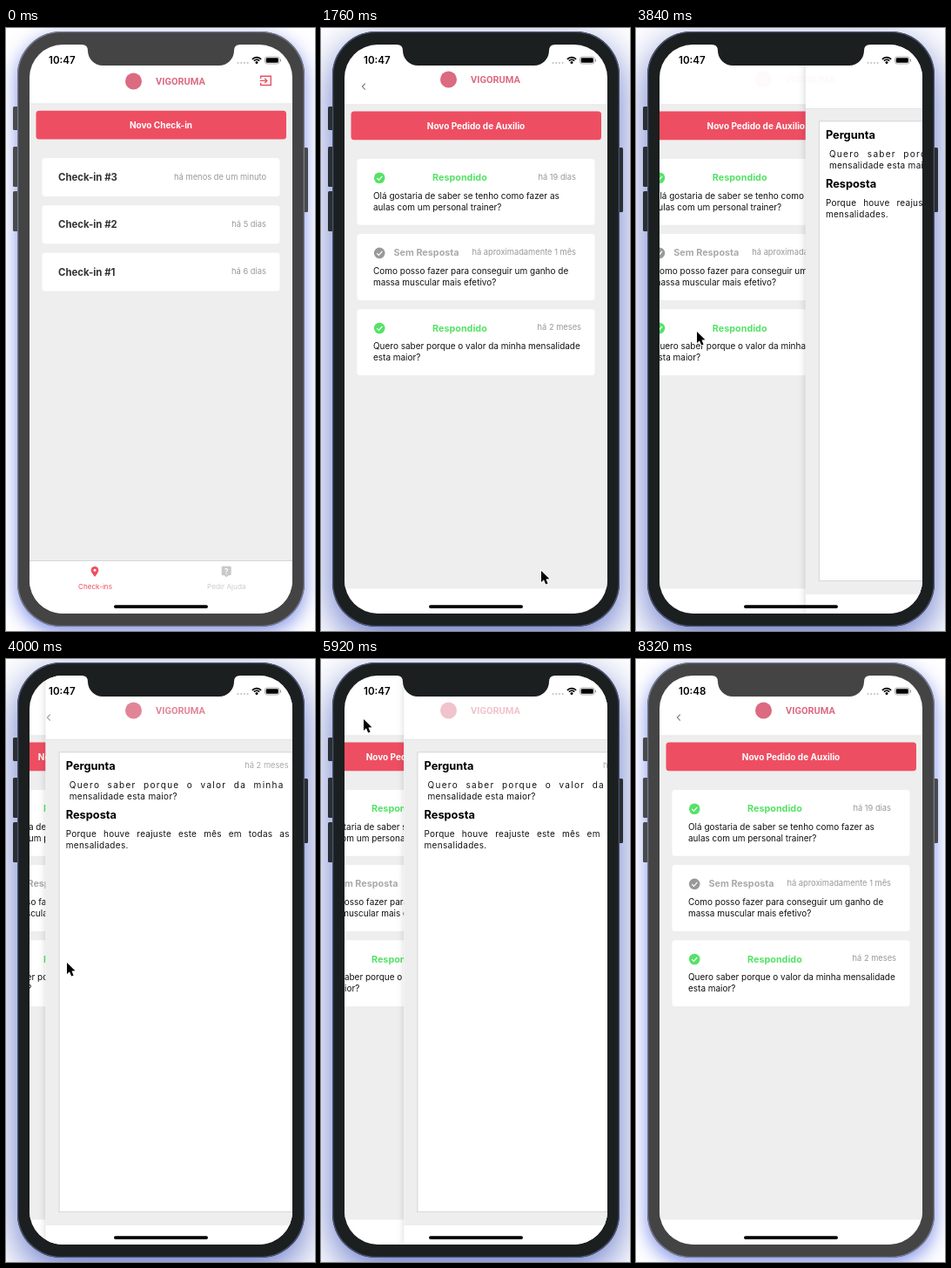
Write an HTML page with a canvas that moves like this. It is 355 by 691 pixels and loops after 8.48 s.

```html
<!DOCTYPE html>
<html lang="pt">
<head>
<meta charset="utf-8">
<title>Check-ins</title>
<style>
html, body { margin: 0; width: 100%; height: 100%; overflow: hidden; background: #fff; }
canvas { display: block; width: 355px; height: 691px; }
</style>
</head>
<body>
<canvas id="stage"></canvas>
<script>
const W = 355, H = 691, LOOP = 8480, STEP = 160;
const SCREEN = { x: 27, y: 19, w: 302, h: 652 };
const RED = '#ee4e62', BRAND = '#dc6a80', GREEN = '#55e267', GRAY = '#999', PAGE = '#eee';
const canvas = document.getElementById('stage');
const ctx = canvas.getContext('2d');
const ratio = window.devicePixelRatio || 1;
canvas.width = W * ratio;
canvas.height = H * ratio;

// ---------- helpers ----------
function box(x, y, w, h, r, fill) {
  ctx.beginPath();
  ctx.roundRect(x, y, w, h, r);
  ctx.fillStyle = fill;
  ctx.fill();
}

function disc(x, y, r, fill) {
  ctx.beginPath();
  ctx.arc(x, y, r, 0, 7);
  ctx.fillStyle = fill;
  ctx.fill();
}

function line(points, color, width) {
  ctx.beginPath();
  points.forEach(([x, y]) => ctx.lineTo(x, y));
  ctx.strokeStyle = color;
  ctx.lineWidth = width;
  ctx.stroke();
}

function text(str, x, y, size, { color = '#111', weight = 400, align = 'left', family = 'Inter', spacing = 0 } = {}) {
  ctx.font = `${weight} ${size}px ${family}, sans-serif`;
  ctx.letterSpacing = spacing + 'px';
  ctx.textAlign = align;
  ctx.fillStyle = color;
  ctx.fillText(str, x, y);
}

function justify(str, x, y, width, size, spacing) {
  const words = str.split(' ');
  ctx.font = `400 ${size}px Inter, sans-serif`;
  ctx.letterSpacing = spacing + 'px';
  const widths = words.map(word => ctx.measureText(word).width);
  const gap = (width - widths.reduce((a, b) => a + b)) / (words.length - 1);
  words.forEach((word, i) => {
    text(word, x, y, size, { spacing });
    x += widths[i] + gap;
  });
}

function withAlpha(alpha, draw) {
  ctx.save();
  ctx.globalAlpha *= alpha;
  draw();
  ctx.restore();
}

const clamp = v => Math.min(1, Math.max(0, v));
const smooth = v => v * v * (3 - 2 * v);

// Cubic bezier (0.2833, 0.99, 0.31833, 0.99)
function slideEase(x) {
  if (x <= 0 || x >= 1) return clamp(x);
  const curve = (a, b, u) => 3 * u * (1 - u) ** 2 * a + 3 * u * u * (1 - u) * b + u ** 3;
  let lo = 0, hi = 1;
  for (let i = 0; i < 24; i++) {
    const mid = (lo + hi) / 2;
    if (curve(0.2833, 0.31833, mid) < x) lo = mid; else hi = mid;
  }
  return curve(0.99, 0.99, lo);
}

// ---------- phone ----------
function phone(focused) {
  const body = focused ? '#1b1f1f' : '#444';
  const button = focused ? '#2b2f33' : '#4a4a4c';
  const rim = focused ? '#4a5474' : '#747a90';
  ctx.save();
  ctx.shadowColor = focused ? 'rgba(60,82,185,.8)' : 'rgba(75,98,225,.7)';
  ctx.shadowBlur = (focused ? 46 : 22) * ratio;
  ctx.shadowOffsetY = (focused ? 15 : 7) * ratio;
  box(13, 4, 330, 682, 50, body);
  ctx.restore();
  for (const [x, y, h] of [[8, 90, 27], [8, 136, 46], [8, 187, 46], [341, 137, 74]]) {
    box(x, y, 6, h, 1.5, button);
  }
  box(13, 4, 330, 682, 50, rim);
  box(14.3, 5.3, 327.4, 679.4, 49, body);
  return body;
}

function notch(color) {
  ctx.beginPath();
  ctx.moveTo(82, 18);
  ctx.lineTo(87, 19);
  ctx.quadraticCurveTo(94, 19, 94, 26);
  ctx.arcTo(94, 43, 112, 43, 17);
  ctx.lineTo(245, 43);
  ctx.arcTo(262, 43, 262, 26, 17);
  ctx.quadraticCurveTo(262, 19, 269, 19);
  ctx.lineTo(274, 18);
  ctx.fillStyle = color;
  ctx.fill();
}

function statusBar(clock) {
  text(clock, 49, 41, 11.6, { weight: 600, color: '#000' });
  for (let i = 0; i < 4; i++) disc(266.5 + i * 3.7, 40, 1.1, '#c4c4c4');
  ctx.strokeStyle = '#000';
  ctx.lineWidth = 1.7;
  for (const r of [7, 4.3]) {
    ctx.beginPath();
    ctx.arc(288, 40.6, r, -Math.PI * 0.76, -Math.PI * 0.24);
    ctx.stroke();
  }
  disc(288, 39.6, 1.5, '#000');
  ctx.beginPath();
  ctx.roundRect(297.5, 33, 16.5, 8, 2.4);
  ctx.strokeStyle = '#999';
  ctx.lineWidth = 0.8;
  ctx.stroke();
  box(298.7, 34.2, 14.1, 5.6, 1.3, '#000');
  box(314.9, 35.6, 1.1, 2.8, 0.5, '#999');
}

// ---------- pages ----------
function brand(y) {
  disc(146.5, y, 9.5, BRAND);
  text('VIGORUMA', 172, y + 4, 11, { weight: 700, color: BRAND, family: 'Roboto' });
}

function pageBase(top, bottom) {
  box(27, 19, 302, 652, 0, '#fff');
  box(27, top, 302, bottom - top, 0, PAGE);
  box(27, top - 0.5, 302, 0.7, 0, '#ddd');
}

function redButton(label, y, h) {
  box(34.5, y, 287.5, h, 3.5, RED);
  text(label, 178, y + h / 2 + 3.7, 10, { weight: 700, color: '#fff', align: 'center' });
}

function exitIcon() {
  line([[292.7, 58], [292.7, 55.3], [304.3, 55.3], [304.3, 65.5], [292.7, 65.5], [292.7, 62.7]], RED, 1.4);
  line([[291.7, 60.4], [299, 60.4]], RED, 1.4);
  line([[297.2, 57.8], [299.8, 60.4], [297.2, 63]], RED, 1.4);
}

function tabBar() {
  box(27, 610, 302, 61, 0, '#fff');
  box(27, 610, 302, 0.8, 0, '#c8c8c8');
  ctx.beginPath();
  ctx.moveTo(102, 629);
  ctx.bezierCurveTo(99, 625, 97.7, 623, 97.7, 621.2);
  ctx.arc(102, 621.2, 4.3, Math.PI, 0);
  ctx.bezierCurveTo(106.3, 623, 105, 625, 102, 629);
  ctx.fillStyle = RED;
  ctx.fill();
  disc(102, 621.2, 1.5, '#fff');
  box(247.7, 616.8, 11, 10.5, 1.2, '#c9c9c9');
  ctx.beginPath();
  ctx.moveTo(250.8, 627);
  ctx.lineTo(253.2, 629.6);
  ctx.lineTo(255.6, 627);
  ctx.fill();
  text('?', 253.2, 625.5, 9, { weight: 600, color: '#fff', align: 'center' });
  text('Check-ins', 102.5, 642.5, 8.1, { color: RED, align: 'center' });
  text('Pedir Ajuda', 253.3, 642.5, 8.2, { color: '#ccc', align: 'center' });
}

function checkinsPage() {
  pageBase(87, 610);
  brand(61);
  exitIcon();
  redButton('Novo Check-in', 94.8, 32.7);
  ['há menos de um minuto', 'há 5 dias', 'há 6 dias'].forEach((when, i) => {
    const y = 149 + i * 54.2;
    box(41.5, y, 273, 44, 3.5, '#fff');
    text(`Check-in #${3 - i}`, 60, y + 26.2, 11.4, { weight: 700, color: '#333' });
    text(when, 299, y + 25, 9.35, { color: GRAY, align: 'right' });
  });
  tabBar();
}

const REQUESTS = [
  { done: true, when: 'há 19 dias', right: 293, lines: ['Olá gostaria de saber se tenho como fazer as', 'aulas com um personal trainer?'] },
  { done: false, when: 'há aproximadamente 1 mês', right: 293, lines: ['Como posso fazer para conseguir um ganho de', 'massa muscular mais efetivo?'] },
  { done: true, when: 'há 2 meses', right: 299, lines: ['Quero saber porque o valor da minha mensalidade', 'esta maior?'] },
];

function requestsPage() {
  pageBase(88, 642.5);
  redButton('Novo Pedido de Auxilio', 95.5, 32.7);
  REQUESTS.forEach(({ done, when, right, lines }, i) => {
    const y = 150 + i * 86.1;
    const color = done ? GREEN : GRAY;
    box(41.5, y, 273, 75.8, 3.5, '#fff');
    disc(67.2, y + 21.8, 6.3, color);
    line([[64.2, y + 22], [66.4, y + 24.2], [70.4, y + 19.8]], '#fff', 1.2);
    const label = { weight: 700, color: done ? GREEN : '#aaa' };
    if (done) text('Respondido', 159.4, y + 25.3, 10.8, { ...label, align: 'center' });
    else text('Sem Resposta', 83.5, y + 25.3, 10.8, label);
    text(when, right, y + 23.8, 9.3, { color: GRAY, align: 'right' });
    lines.forEach((str, n) => text(str, 60, y + 46.2 + n * 12.5, 9.97));
  });
}

function detailPage() {
  ctx.save();
  ctx.shadowColor = 'rgba(0,0,0,.22)';
  ctx.shadowBlur = 9 * ratio;
  box(27, 19, 302, 652, 0, '#fff');
  ctx.restore();
  pageBase(92.5, 649);
  box(42, 106.5, 272, 527.5, 0, '#ccc');
  box(42.8, 107.3, 270.4, 525.9, 0, '#fff');
  const title = { weight: 700, color: '#000' };
  text('Pergunta', 50, 127, 12.8, title);
  text('há 2 meses', 306, 125, 9.3, { color: '#aaa', align: 'right' });
  justify('Quero saber porque o valor da minha', 54, 148, 247, 10, 1.3);
  text('mensalidade esta maior?', 54, 160.7, 10, { spacing: 0.3 });
  text('Resposta', 50, 183.3, 12.8, title);
  justify('Porque houve reajuste este mês em todas as', 50, 204.3, 257, 10, 0.25);
  text('mensalidades.', 50, 217, 10, { spacing: 0.3 });
}

function helpStack(progress) {
  const shift = (dx, draw) => {
    ctx.save();
    ctx.translate(dx, 0);
    draw();
    ctx.restore();
  };
  shift(-0.3 * SCREEN.w * progress, requestsPage);
  // the strip uncovered by the parallax stays page coloured
  if (progress > 0) shift(SCREEN.w * (1 - progress), detailPage);
  withAlpha(Math.abs(2 * progress - 1) ** 1.5, () => brand(59));
  const fade = clamp(1 - 4.3 * Math.min(progress, 1 - progress));
  withAlpha(fade, () => line([[50.8, 63.6], [47.4, 67.1], [50.8, 70.6]], '#777', 1.1));
}

// ---------- pointer ----------
const PATH = [
  [480, 372, 470], [1400, 253, 622], [2300, 253, 622], [2860, 90, 355],
  [3000, 90, 355], [3360, 70, 348], [4700, 70, 348], [5760, 49, 69], [LOOP, 49, 69],
];

function pointer(t) {
  if (t < 640 || t >= 6560) return;
  const i = PATH.findIndex(([time]) => time > t);
  const [t0, x0, y0] = PATH[i - 1], [t1, x1, y1] = PATH[i];
  const k = smooth((t - t0) / (t1 - t0));
  ctx.save();
  ctx.translate(x0 + (x1 - x0) * k, y0 + (y1 - y0) * k);
  ctx.beginPath();
  [[0, 0], [0, 13], [3, 10.2], [5.2, 15.4], [7.6, 14.4], [5.4, 9.4], [9.4, 9.3]]
    .forEach(([x, y]) => ctx.lineTo(x, y));
  ctx.closePath();
  ctx.strokeStyle = '#fff';
  ctx.lineWidth = 1.6;
  ctx.stroke();
  ctx.fillStyle = '#000';
  ctx.fill();
  ctx.restore();
}

// ---------- scene ----------
function draw(t) {
  ctx.setTransform(ratio, 0, 0, ratio, 0, 0);
  ctx.fillStyle = '#fff';
  ctx.fillRect(0, 0, W, H);
  const body = phone(t >= 1600 && t < 8320);

  ctx.save();
  ctx.beginPath();
  ctx.roundRect(SCREEN.x, SCREEN.y, SCREEN.w, SCREEN.h, 38);
  ctx.clip();
  if (t < 1760) checkinsPage();
  else helpStack(t < 5000 ? slideEase((t - 3773) / 500) : 1 - slideEase((t - 5887) / 500));
  statusBar(t < 7840 ? '10:47' : '10:48');
  box(124, 661.2, 108, 3.8, 1.9, '#000');
  ctx.restore();

  notch(body);
  pointer(t);
}

function tick(now) {
  draw(Math.floor((now % LOOP) / STEP) * STEP);
  requestAnimationFrame(tick);
}
requestAnimationFrame(tick);
</script>
</body>
</html>
```
